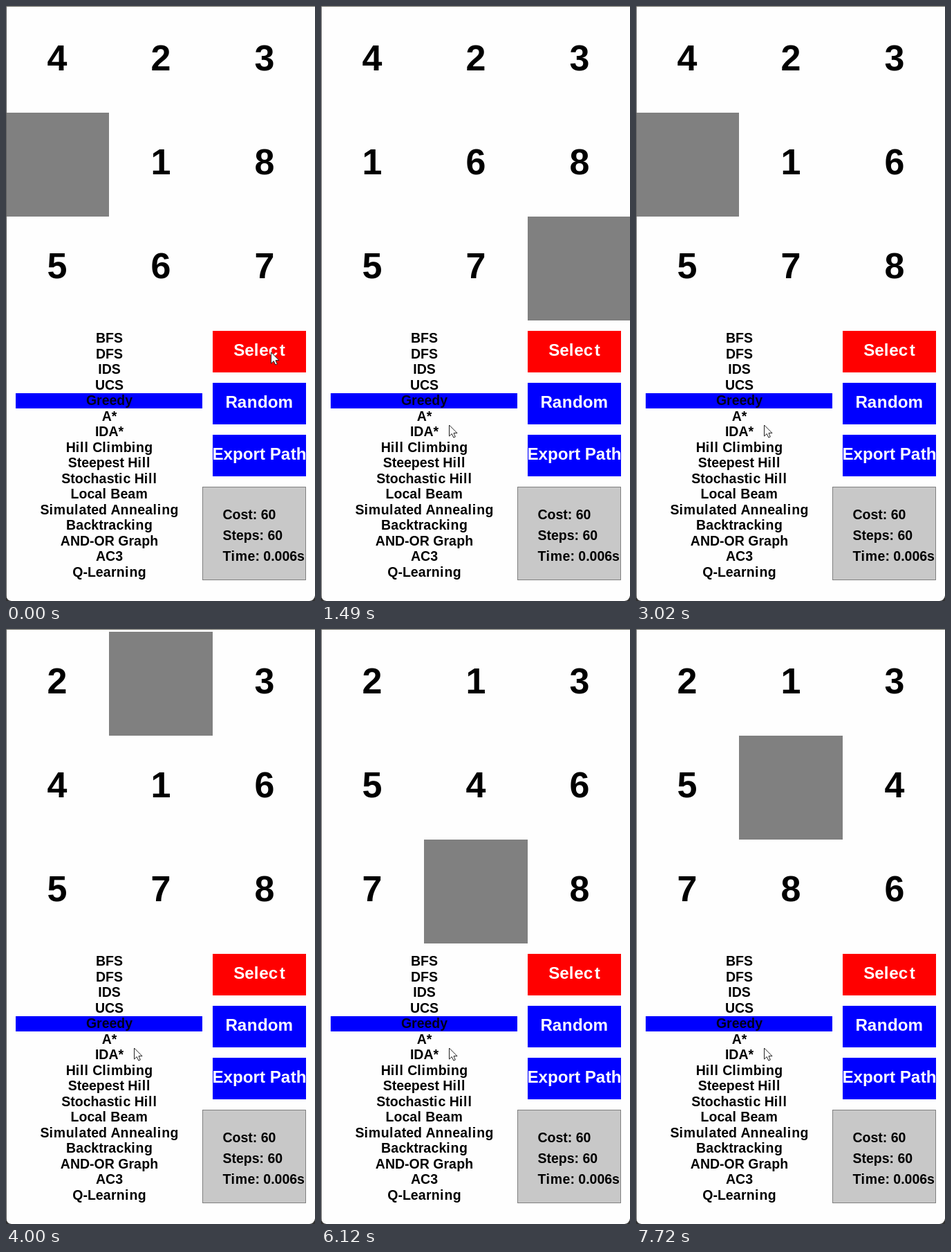
Recreate the animation shown at these times as an HTML page with a canvas. Size 447x859 px, loop 8000 ms.

```html
<!DOCTYPE html>
<html lang="en">
<head>
<meta charset="utf-8">
<title>Sliding puzzle solver</title>
<style>
  html, body { margin: 0; width: 100%; height: 100%; overflow: hidden; background: #fefefe; }
  canvas { display: block; width: 447px; height: 859px; }
</style>
</head>
<body>
<canvas id="stage" width="447" height="859"></canvas>
<script>
const ctx = document.getElementById('stage').getContext('2d');
const LOOP = 8000, CELL = 150, TOP = 4;

// 0 is the empty cell; each move swaps it with the given cell.
const START = [4, 2, 3, 0, 1, 8, 5, 6, 7];
const MOVES = [
  [400, 4], [970, 7], [1490, 8], [1940, 5], [2450, 4],
  [3020, 3], [3570, 0], [4000, 1], [4580, 4], [5130, 3],
  [5660, 6], [6120, 7], [6680, 8], [7160, 5], [7720, 4]
];
const POINTER = [
  [0, 383, 500], [520, 383, 499], [670, 367, 502], [820, 208, 529],
  [1120, 190, 575], [1240, 186, 598], [1370, 185, 605]
];
const ARROW = [[0, 0], [0, 16], [3.8, 12.6], [6.3, 18], [8.8, 17], [6.5, 11.6], [11.5, 11.6]];

const METHODS = ['BFS', 'DFS', 'IDS', 'UCS', 'Greedy', 'A*', 'IDA*', 'Hill Climbing',
  'Steepest Hill', 'Stochastic Hill', 'Local Beam', 'Simulated Annealing',
  'Backtracking', 'AND-OR Graph', 'AC3', 'Q-Learning'];
const CHOSEN = 4;
const BUTTONS = [['Select', '#f00'], ['Random', '#00f'], ['Export Path', '#00f']];
const STATS = ['Cost: 60', 'Steps: 60', 'Time: 0.006s'];

// Extra advance caused by whole-pixel glyph spacing.
const EXTRA = { i: .9, l: .9, a: .5, m: .5, n: .5, u: .5, ct: 2.5 };

function box(x, y, w, h, color) {
  ctx.fillStyle = color;
  ctx.fillRect(x, y, w, h);
}

function text(str, x, y, size, color, centered) {
  ctx.font = `bold ${size}px "Liberation Sans", Arial, sans-serif`;
  ctx.fillStyle = color;
  const steps = [...str].map((c, i) =>
    ctx.measureText(c).width + (EXTRA[c + str[i + 1]] || EXTRA[c] || 0));
  if (centered) x -= steps.reduce((a, b) => a + b) / 2;
  steps.forEach((w, i) => {
    ctx.fillText(str[i], x, y);
    x += w;
  });
}

function boardAt(t) {
  const cells = START.slice();
  for (const [at, to] of MOVES) {
    if (t < at) break;
    const from = cells.indexOf(0);
    cells[from] = cells[to];
    cells[to] = 0;
  }
  return cells;
}

function drawBoard(t) {
  boardAt(t).forEach((n, i) => {
    const x = i % 3 * CELL - 1, y = Math.floor(i / 3) * CELL + TOP;
    if (n) text(String(n), x + 75, y + 89, 52, '#000', true);
    else box(x, y, CELL, CELL, '#808080');
  });
}

function drawPanel() {
  box(14, 559, 270, 22, '#00f');
  METHODS.forEach((name, i) =>
    text(name, 149.5, 486 + i * 22.5, 19.5, i === CHOSEN ? '#00001c' : '#000', true));

  BUTTONS.forEach(([label, color], i) => {
    const y = 469 + i * 75;
    box(299, y, 135, 60, color);
    text(label, 366.5, y + 36, 24.2, '#fff', true);
  });

  box(284, 694, 150, 135, '#808080');
  box(285, 695, 148, 133, '#c8c8c8');
  STATS.forEach((line, i) => text(line, 313.5, 740.5 + i * 30, 19.5, '#000'));
}

function drawPointer(t) {
  const [, x, y] = POINTER.filter(p => p[0] <= t).pop();
  ctx.beginPath();
  ARROW.forEach(([dx, dy]) => ctx.lineTo(x + dx + .5, y + dy));
  ctx.closePath();
  ctx.fillStyle = '#fff';
  ctx.fill();
  ctx.strokeStyle = '#222';
  ctx.lineWidth = 1;
  ctx.stroke();
}

function drawEdges() {
  box(0, 0, 447, 1, '#6c6c62');
  box(0, 0, 1, 859, '#626262');
  ctx.fillStyle = '#333';
  for (const [x, dir] of [[0, 1], [447, -1]]) {
    ctx.beginPath();
    ctx.moveTo(x, 851);
    ctx.quadraticCurveTo(x + dir, 858, x + dir * 8, 859);
    ctx.lineTo(x, 859);
    ctx.fill();
  }
}

function draw(now) {
  const t = now % LOOP;
  box(0, 0, 447, 859, '#fefefe');
  drawBoard(t);
  drawPanel();
  drawEdges();
  drawPointer(t);
}

const begin = performance.now();
function tick() {
  draw(performance.now() - begin);
  requestAnimationFrame(tick);
}
tick();
</script>
</body>
</html>
```
